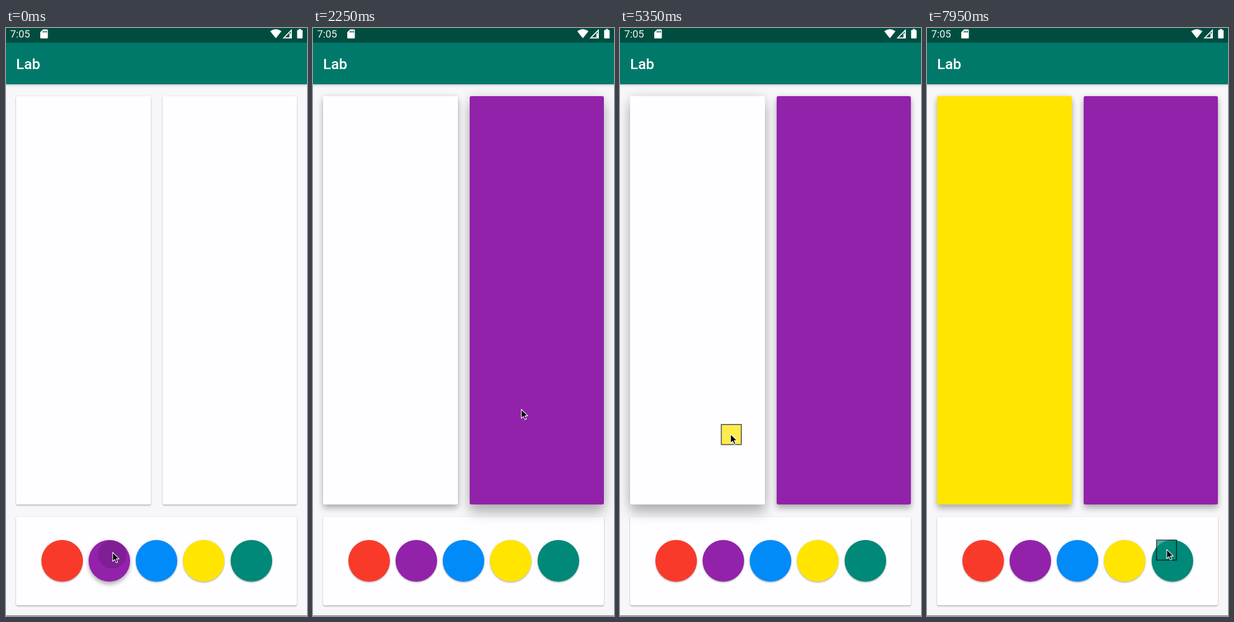
These frames come from a looping animation (536x1044 px, 8000 ms). An HTML page:

```html
<!DOCTYPE html>
<html lang="en">
<head>
<meta charset="utf-8">
<title>Lab</title>
<style>
html, body { margin: 0; width: 100%; height: 100%; overflow: hidden; background: #f7f6f8; }
#stage { position: absolute; left: 0; top: 0; width: 536px; height: 1044px; overflow: hidden; background: #f7f6f8; }
#stage > * { position: absolute; }
.box { border-radius: 3px; background: #fefdff; }
.dot { width: 74px; height: 74px; top: 909px; border-radius: 50%; overflow: hidden; }
.ripple { position: absolute; border-radius: 50%; background: #000; }
#bar { left: 0; top: 26px; width: 536px; height: 73.5px; background: #00796b; box-shadow: 0 2px 4px rgba(0,0,0,.16); }
#status { left: 0; top: 0; width: 536px; height: 26px; background: #004d40; }
#edge { left: 0; top: 1043px; width: 536px; height: 1px; background: #6f6f70; }
svg { left: 0; top: 0; z-index: 5; }
text { fill: #fff; font-family: Roboto, sans-serif; }
</style>
</head>
<body>
<div id="stage">
  <div id="bar"></div>
  <div id="status"></div>
  <div id="edge"></div>
  <svg width="536" height="1044" viewBox="0 0 536 1044">
    <text x="7.5" y="17.3" font-size="18.3" fill-opacity=".93">7:05</text>
    <text x="18" y="73" font-size="26.1" font-weight="500">Lab</text>
    <g fill="#fff">
      <path fill-rule="evenodd" d="M66 2.5H73Q74.5 2.5 74.5 4V17Q74.5 18.6 73 18.6H62.5Q61 18.6 61 17V7.5ZM65.6 5V8.3H67.1V5ZM68.5 5V8.3H70V5ZM71.3 5V8.3H72.8V5Z"/>
      <path d="M470.5 5.8Q480.5 -1.6 490.5 5.8L480.5 18.2Z"/>
      <path fill-rule="evenodd" d="M509 1.8V18.4H492.4ZM507.2 6.2L496.8 16.6H504.6V9.5H507.2Z"/>
      <path d="M521.3 3.4V1.8H525.3V3.4H527Q528.2 3.4 528.2 4.6V17.2Q528.2 18.4 527 18.4H519.6Q518.4 18.4 518.4 17.2V4.6Q518.4 3.4 519.6 3.4Z"/>
    </g>
    <rect id="chip" x="-17.8" y="-17.8" width="35.6" height="35.6" stroke="#000" stroke-width="1.6" opacity=".7"/>
    <path id="arrow" d="M0 0V16L3.7 12.6L6.3 18.4L8.9 17.2L6.4 11.6H11.5Z" fill="#000" stroke="#fff" stroke-width="1.1" stroke-linejoin="round"/>
  </svg>
</div>
<script>
const LOOP = 8000;
const stage = document.getElementById('stage');
const chip = document.getElementById('chip');
const arrow = document.getElementById('arrow');

const colors = ['#f93a2a', '#9222aa', '#008bf9', '#ffe500', '#008978'];

// Pointer keys: time, x, y
const path = [
  [0, 190, 931], [480, 190, 931], [1000, 217, 873], [1550, 322, 733],
  [2050, 371, 677], [2400, 371, 677], [2980, 353, 934], [3620, 353, 934],
  [4250, 322, 790], [4800, 262, 748], [5350, 197, 721], [6050, 164, 717],
  [6680, 164, 717], [7230, 427, 929], [7740, 427, 929], [7950, 427, 926], [8000, 427, 925]
];

// Each drag: button, press, lift and drop times, target card
const drags = [
  { dot: 1, press: -65, lift: 430, drop: 2225, card: 1 },
  { dot: 3, press: 3070, lift: 3570, drop: 6525, card: 0 },
  { dot: 4, press: 7260, lift: 7740, drop: 99999 }
];
const SETTLE = 125;

function add(cls, left, width, parent = stage) {
  const el = document.createElement('div');
  el.className = cls;
  el.style.left = left + 'px';
  el.style.width = width + 'px';
  parent.appendChild(el);
  return el;
}

function makeBox(x, y, w, h) {
  const el = add('box', x, w);
  el.style.top = y + 'px';
  el.style.height = h + 'px';
  return el;
}

function lift(el, e) {
  el.style.boxShadow = `0 ${0.9 * e}px ${1.3 * e}px rgba(0,0,0,.25), 0 0 ${1.2 * e}px rgba(0,0,0,.11)`;
}

const clamp = v => Math.max(0, Math.min(1, v));
const ease = v => v * v * (3 - 2 * v);

const panel = makeBox(18, 867.5, 500, 157);
lift(panel, 2);
const cards = [makeBox(18, 121, 240, 725), makeBox(279, 121, 239, 725)];
const dots = colors.map((c, i) => {
  const el = add('dot', 62.5 + 84.25 * i, 74);
  el.style.background = c;
  el.ripple = add('ripple', 0, 0, el);
  return el;
});

function slope(i, k) {
  if (i <= 0 || i >= path.length - 1) return 0;
  const [a, b, c] = [path[i - 1], path[i], path[i + 1]];
  const p = (b[k] - a[k]) / (b[0] - a[0]);
  const q = (c[k] - b[k]) / (c[0] - b[0]);
  return p * q > 0 ? 2 * p * q / (p + q) : 0;
}

function pointer(t) {
  t = Math.max(0, t);
  let i = 0;
  while (i < path.length - 2 && t >= path[i + 1][0]) i++;
  const a = path[i], b = path[i + 1], d = b[0] - a[0];
  const u = (t - a[0]) / d, v = 1 - u;
  return [1, 2].map(k =>
    a[k] * v * v * (1 + 2 * u) + b[k] * u * u * (3 - 2 * u) +
    d * u * v * (v * slope(i, k) - u * slope(i + 1, k)));
}

function drawDot(el, i, t) {
  const d = drags.find(d => d.dot === i);
  const age = t - d?.press, gone = clamp((t - d?.lift) / 120);
  const on = d && age >= 0 && gone < 1;
  el.ripple.style.display = on ? '' : 'none';
  lift(el, on ? 2 + 4 * clamp(age / 60) * (1 - gone) : 2);
  if (!on) return;
  const grow = ease(clamp(age / 260));
  const r = 18 + 42 * grow;
  const [x, y] = pointer(d.press);
  const cx = x - (62.5 + 84.25 * i), cy = y + 2 - 909;
  Object.assign(el.ripple.style, {
    width: 2 * r + 'px', height: 2 * r + 'px',
    left: cx + (37 - cx) * grow - r + 'px',
    top: cy + (37 - cy) * grow - r + 'px',
    opacity: 0.12 * (1 - gone)
  });
}

function inside(i, [x, y]) {
  const left = i ? 279 : 18;
  return x >= left && x <= left + 240 && y >= 121 && y <= 846;
}

function draw(t) {
  const [x, y] = pointer(t);
  const drag = drags.find(d => t >= d.lift && t < d.drop + SETTLE);
  arrow.setAttribute('transform', `translate(${x} ${y})`);

  const held = drag && t < drag.drop;
  chip.style.display = held ? '' : 'none';
  if (held) {
    const [cx, cy] = pointer(t - 25);
    chip.setAttribute('transform', `translate(${cx - 0.5} ${cy + 0.5})`);
    chip.setAttribute('fill', colors[drag.dot]);
  }

  cards.forEach((el, i) => {
    const over = drag && inside(i, [x, y]);
    const filled = drags.find(d => d.card === i && t >= d.drop);
    el.style.background = filled ? colors[filled.dot] : '#fefdff';
    el.style.zIndex = over ? 2 : 1;
    lift(el, over ? 16 : drag ? 8 : 2);
  });
  dots.forEach((el, i) => drawDot(el, i, t));
}

function tick() {
  draw(performance.now() % LOOP);
  requestAnimationFrame(tick);
}
tick();
</script>
</body>
</html>
```
